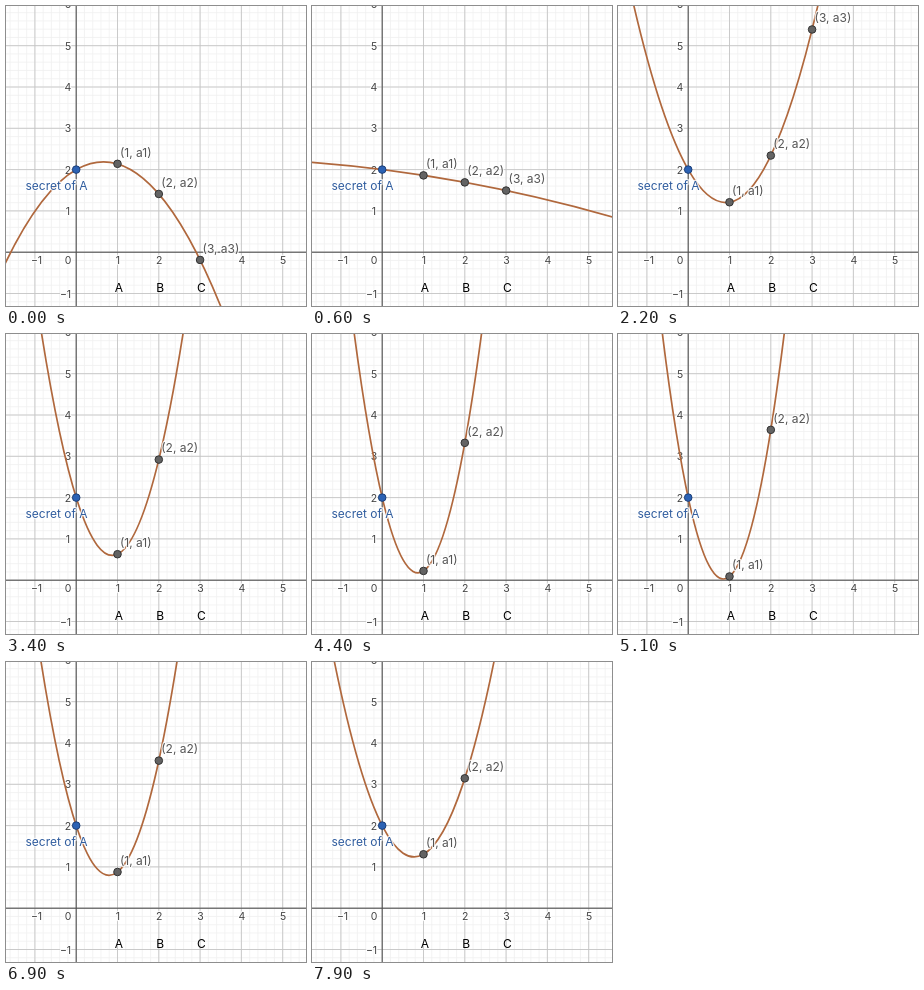
Animation of 300 by 300 pixels, one loop 8000 ms. Source, as an HTML page:

```html
<!DOCTYPE html>
<html lang="en">
<head>
<meta charset="utf-8">
<title>Parabola through moving points</title>
<style>
  html, body { margin: 0; width: 100%; height: 100%; overflow: hidden; background: #fff; }
  svg { display: block; width: 100vw; height: 100vh; }
  text { font: 12px Inter, Roboto, sans-serif; }
  .tick { font-size: 10.5px; fill: #444; text-anchor: middle; }
  .halo { paint-order: stroke; stroke: #fff; stroke-opacity: .8; stroke-width: 2.5px; stroke-linejoin: round; }
  .label { fill: #555; }
  .secret { fill: #2f5c9e; }
  .letter { fill: #000; text-anchor: middle; }
</style>
</head>
<body>
<svg id="stage" viewBox="0 0 300 300"></svg>
<script>
const LOOP = 8000, UNIT = 41.3, X0 = 70.2, Y0 = 246.2;
const stage = document.getElementById('stage');
const px = x => X0 + UNIT * x;
const py = y => Y0 - UNIT * y;

function add(tag, attrs, text) {
  const el = document.createElementNS('http://www.w3.org/2000/svg', tag);
  for (const key in attrs) el.setAttribute(key, attrs[key]);
  if (text) el.textContent = text;
  return stage.appendChild(el);
}

function gridLines(step, stroke, width) {
  let d = '';
  for (let i = Math.ceil(-2 / step); i * step < 7; i++) {
    d += `M${px(i * step)} 0V300M0 ${py(i * step)}H300`;
  }
  add('path', { d, stroke, 'stroke-width': width });
}

gridLines(0.2, '#f0f0f0', 0.8);
gridLines(1, '#c6c6c6', 0.9);
add('path', { d: `M${X0} 0V300M0 ${Y0}H300`, stroke: '#4a4a4a', 'stroke-width': 1 });

const tick = (x, y, n) => add('text', { x, y, class: 'tick halo' }, String(n).replace('-', '−'));
for (let n = -1; n <= 6; n++) {
  if (n === 0) { tick(62, 258.3, 0); continue; }
  if (n < 6) tick(n < 0 ? 30.5 : px(n) + 0.5, 258.3, n);
  tick(n < 0 ? 59.5 : 62, py(n) + 4, n);
}
['A', 'B', 'C'].forEach((c, i) => add('text', { x: px(i + 1) + 1.3, y: 286.3, class: 'letter' }, c));

const curve = add('path', { fill: 'none', stroke: '#b0683d', 'stroke-width': 1.7 });
const dot = (x, y, fill, stroke) => add('circle', { cx: px(x), cy: py(y), r: 3.8, fill, stroke, 'stroke-width': 1 });
dot(0, 2, '#2c62b4', '#1c3f78');
const points = [1, 2, 3].map(n => dot(n, 0, '#636363', '#333'));
add('text', { x: 19.5, y: 184.3, class: 'secret halo' }, 'secret of A');
const labels = [1, 2, 3].map(n => add('text', { x: px(n) + 2.4, class: 'label halo' }, `(${n}, a${n})`));

// Time in ms, distance travelled by the sliders
const TRAVEL = [[0, 0], [1200, .56], [2200, .93], [3400, 1.51], [4400, 1.915], [5800, 2.545], [7900, 3.445], [8000, 3.49]];

function travel(t) {
  const i = TRAVEL.findIndex(k => k[0] > t);
  const [t0, s0] = TRAVEL[i - 1], [t1, s1] = TRAVEL[i];
  return s0 + (s1 - s0) * (t - t0) / (t1 - t0);
}

function draw(t) {
  // a1 bounces at 0, a2 bounces at 4; a3 follows from the parabola through (0, 2)
  const s = travel(t);
  const a1 = Math.abs(2.14 - s);
  const a2 = 4 - Math.abs(2.59 - s);
  const a = (a2 - 2 * a1 + 2) / 2;
  const b = a1 - 2 - a;
  const f = x => 2 + b * x + a * x * x;

  const l = -1.9, r = 5.8, m = (l + r) / 2;
  const bend = f(l) + (b + 2 * a * l) * (m - l);
  curve.setAttribute('d', `M${px(l)} ${py(f(l))}Q${px(m)} ${py(bend)} ${px(r)} ${py(f(r))}`);
  points.forEach((p, i) => {
    const y = py(f(i + 1));
    p.setAttribute('cy', y);
    labels[i].setAttribute('y', y - 7.3);
  });
}

const start = performance.now();
function frame() {
  draw((performance.now() - start) % LOOP);
  requestAnimationFrame(frame);
}
frame();
</script>
</body>
</html>
```
